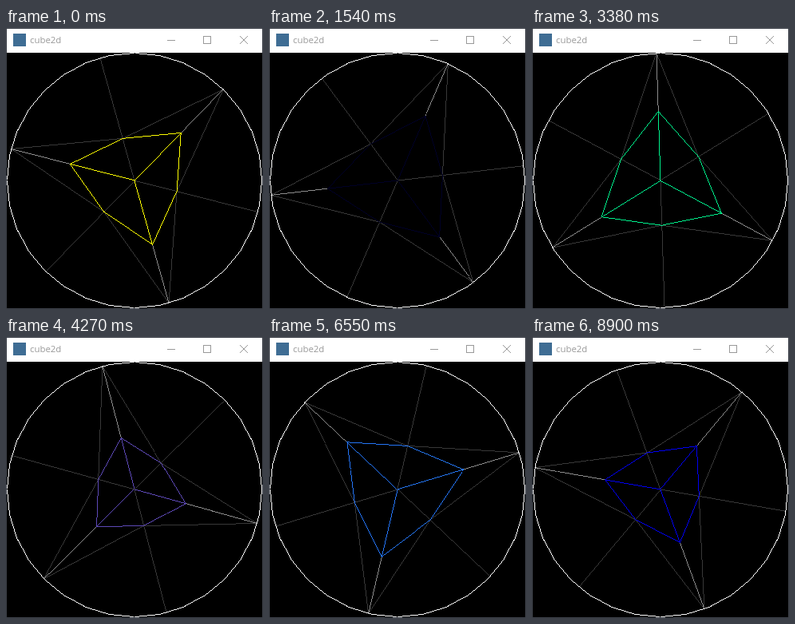
An HTML page with a canvas that plays this animation: 322x352 px, repeating every 8920 ms.

```html
<!DOCTYPE html>
<html lang="en">
<head>
<meta charset="utf-8">
<title>cube2d</title>
<style>
  html, body { margin: 0; width: 322px; height: 352px; overflow: hidden; background: #000; }
  canvas { display: block; }
  #title {
    position: absolute; left: 30px; top: 7px;
    font: 11.4px/16px "Open Sans", "Noto Sans", sans-serif; color: #999;
  }
</style>
</head>
<body>
<canvas id="stage" width="322" height="352"></canvas>
<div id="title">cube2d</div>
<script>
const ctx = document.getElementById('stage').getContext('2d');
const LOOP = 8920, CX = 161, CY = 191, R = 159.5, SIDES = 32;

const TIMES = [0, 1540, 3380, 5170, 6550, 7440, 8900];
const ANGLE = [74.35, 53.4, 28.2, 2.55, -16.8, -29.5, -50.1];
const CLOCK = [0, 1.522, 3.33, 5.151, 6.426, 7.357, 8.9];

function along(values, t) {
  let i = 0;
  while (i < TIMES.length - 2 && t > TIMES[i + 1]) i++;
  const f = (t - TIMES[i]) / (TIMES[i + 1] - TIMES[i]);
  return values[i] + (values[i + 1] - values[i]) * f;
}

const polar = (r, a) => [CX + r * Math.cos(a), CY + r * Math.sin(a)];

// One pixel wide line without smoothing
function line([x0, y0], [x1, y1], color) {
  ctx.fillStyle = color;
  const n = Math.max(1, Math.round(Math.max(Math.abs(x1 - x0), Math.abs(y1 - y0))));
  for (let i = 0; i <= n; i++) {
    ctx.fillRect(Math.floor(x0 + (x1 - x0) * i / n), Math.floor(y0 + (y1 - y0) * i / n), 1, 1);
  }
}

function drawWindow() {
  ctx.fillStyle = '#3a3e46';
  ctx.fillRect(0, 0, 322, 352);
  ctx.fillStyle = '#fff';
  ctx.fillRect(1, 1, 320, 30);
  ctx.fillStyle = '#3f6d94';
  ctx.fillRect(9, 7, 16, 16);
  ctx.fillStyle = ctx.strokeStyle = '#999';
  ctx.fillRect(202, 15, 10, 1);
  ctx.strokeRect(247.5, 10.5, 9, 9);
  ctx.beginPath();
  ctx.moveTo(293, 10); ctx.lineTo(303, 20);
  ctx.moveTo(303, 10); ctx.lineTo(293, 20);
  ctx.stroke();
  ctx.beginPath();
  ctx.rect(1, 31, 320, 320);
  ctx.clip();
}

function cubeColor(c) {
  const waves = [Math.cos(1.2 * c), Math.cos(1.785 * c), Math.sin(0.24 * (c - 0.9))];
  return `rgb(${waves.map(v => Math.round(255 * Math.max(0, v)))})`;
}

function draw(t) {
  const clock = along(CLOCK, t);
  const size = 150 + 50 * Math.cos(1.06 + 3.64 * clock);
  const near = R * size / (R + size);
  const far = R * near / (R + near);
  const color = cubeColor(clock);
  const center = [CX, CY];
  const axes = [0, 1, 2].map(i => (along(ANGLE, t) + 120 * i) * Math.PI / 180);

  ctx.fillStyle = '#000';
  ctx.fillRect(1, 31, 320, 320);

  for (const a of axes) {
    line(polar(R, a + Math.PI), center, '#383838');
    for (const side of [-1, 1]) line(polar(R, a), polar(far, a + side * Math.PI / 3), '#383838');
  }
  for (const a of axes) line(polar(R, a), polar(near, a), '#8c8c8c');
  for (const a of axes) {
    const corner = polar(near, a);
    line(center, corner, color);
    for (const side of [-1, 1]) line(corner, polar(far, a + side * Math.PI / 3), color);
  }
  for (let i = 0; i < SIDES; i++) {
    const step = 2 * Math.PI / SIDES;
    line(polar(R, i * step), polar(R, (i + 1) * step), '#fff');
  }
}

drawWindow();
const start = performance.now();
function tick() {
  draw((performance.now() - start) % LOOP);
  requestAnimationFrame(tick);
}
tick();
</script>
</body>
</html>
```
